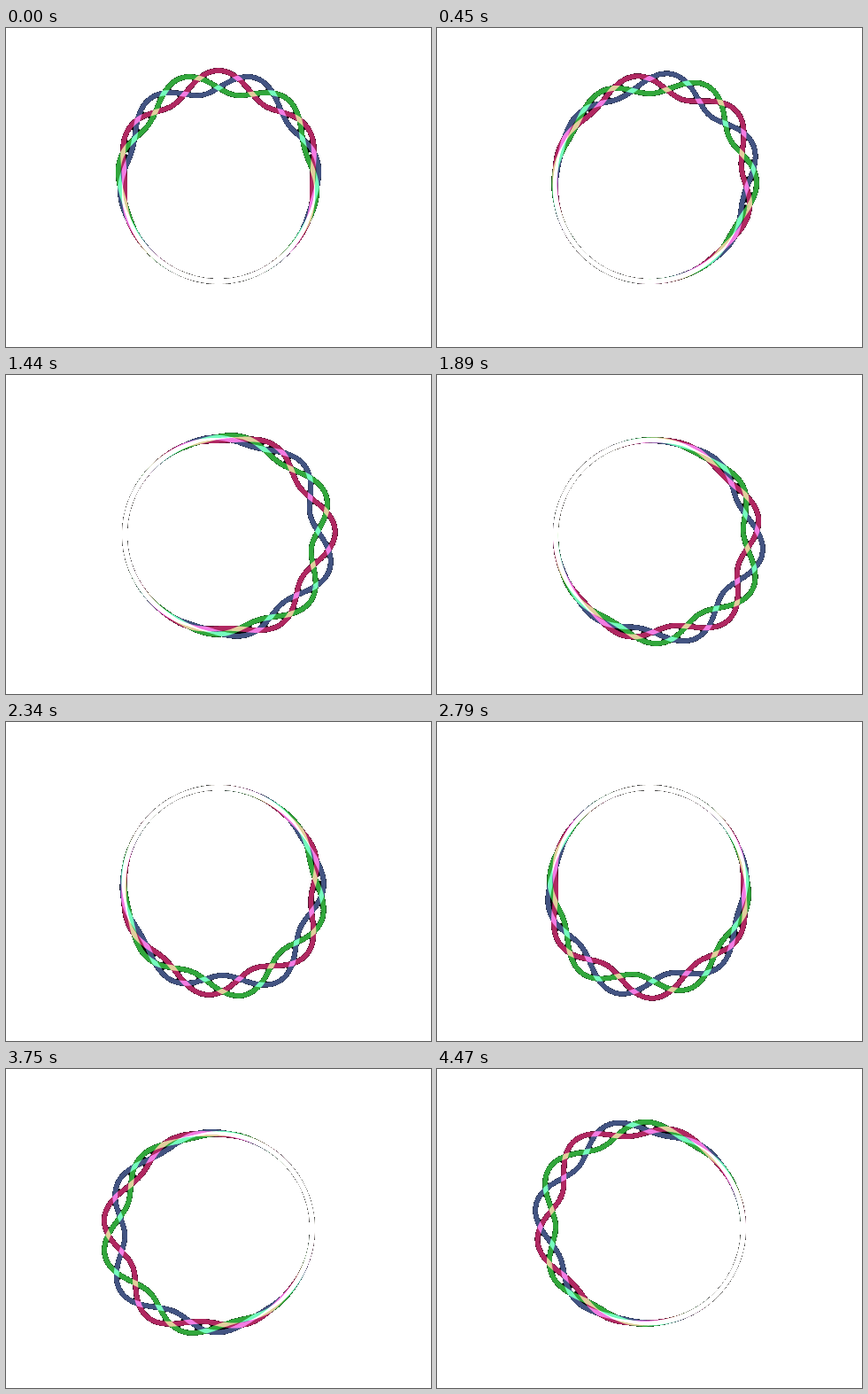
An HTML page with a canvas that plays this animation: 480 px wide and 360 px high, repeating every 4.5 s.

```html
<!DOCTYPE html>
<html>
<head>
<meta charset="utf-8">
<title>Braided ring</title>
<style>
html, body { margin: 0; width: 100%; height: 100%; overflow: hidden; background: #fff; }
canvas { display: block; }
</style>
</head>
<body>
<canvas id="stage" width="480" height="360"></canvas>
<script>
const W = 480, H = 360;
const ctx = document.getElementById('stage').getContext('2d', { willReadFrequently: true });
const LOOP = 4500, TAU = Math.PI * 2, STEPS = 720;
const RADIUS = 106, SWELL = 26, WAVES = 6, THICKNESS = 5.9;
const DARKEST = 54, NARROW = 8.4;
const COLORS = ['#b02861', '#32a73c', '#435482'];

// The swell travels clockwise while the waves slip slowly backwards.
function radius(a, strand, turn) {
  const swell = ((1 + Math.cos(a - turn)) / 2) ** 2;
  const wave = (1 + Math.cos(WAVES * a + 2 * turn + strand * TAU / 3)) / 2;
  return RADIUS + SWELL * swell * wave;
}

const point = (a, r) => [r * Math.sin(a), -r * Math.cos(a)];

function strandPath(strand, turn) {
  const path = new Path2D();
  for (let i = 0; i < STEPS; i++) {
    const a = i / STEPS * TAU;
    path.lineTo(...point(a, radius(a, strand, turn)));
  }
  path.closePath();
  return path;
}

// Narrow gaps between neighbouring strands stay black.
function gapPath(turn) {
  const path = new Path2D();
  for (let i = 0; i < STEPS; i++) {
    const a = i / STEPS * TAU;
    const r = COLORS.map((_, s) => radius(a, s, turn)).sort((p, q) => p - q);
    for (let k = 0; k < 2; k++) {
      if (r[k + 1] - r[k] > NARROW) continue;
      path.moveTo(...point(a, r[k]));
      path.lineTo(...point(a, r[k + 1]));
    }
  }
  return path;
}

function stroke(path, color, width) {
  ctx.strokeStyle = color;
  ctx.lineWidth = width;
  ctx.stroke(path);
}

// Dark pixels become clear, which leaves a hard, dark-tinged edge.
function clearDark() {
  const image = ctx.getImageData(0, 0, W, H), d = image.data;
  for (let i = 0; i < d.length; i += 4) {
    if (Math.max(d[i], d[i + 1], d[i + 2]) < DARKEST) d[i + 3] = 0;
  }
  ctx.putImageData(image, 0, 0);
}

function draw(now) {
  const turn = now % LOOP / LOOP * TAU * 5 / 6;
  ctx.setTransform(1, 0, 0, 1, 0, 0);
  ctx.globalCompositeOperation = 'source-over';
  ctx.fillStyle = '#000';
  ctx.fillRect(0, 0, W, H);
  ctx.translate(W / 2, H / 2);
  ctx.lineJoin = 'round';
  ctx.globalCompositeOperation = 'lighter';
  COLORS.forEach((color, s) => stroke(strandPath(s, turn), color, THICKNESS));
  clearDark();
  ctx.globalCompositeOperation = 'destination-over';
  stroke(gapPath(turn), '#000', 1.4);
}

let start;
function tick(now) {
  start ??= now;
  draw(now - start);
  requestAnimationFrame(tick);
}
draw(0);
requestAnimationFrame(tick);
</script>
</body>
</html>
```
